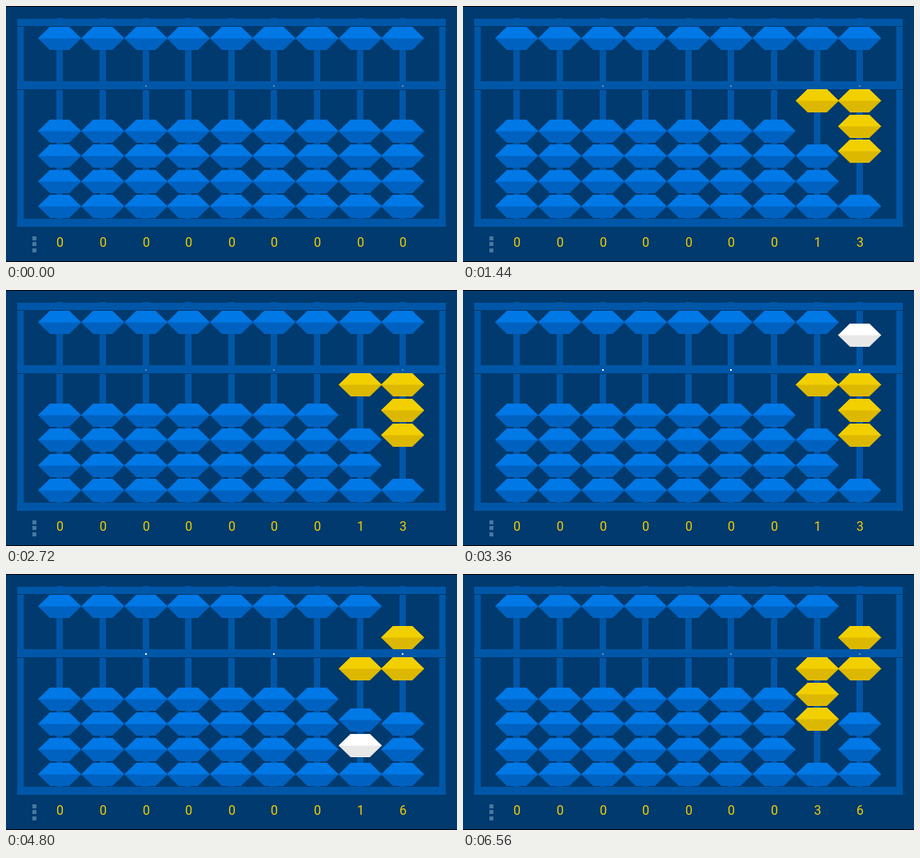
Recreate the animation shown at these times as an HTML page with a canvas. Size 564x320 px, loop 6.72 s.

```html
<!DOCTYPE html>
<html lang="en">
<head>
<meta charset="utf-8">
<title>Abacus</title>
<style>
html, body { margin: 0; width: 100%; height: 100%; overflow: hidden; background: #003a6e; }
canvas { display: block; }
</style>
</head>
<body>
<canvas id="stage" width="564" height="320"></canvas>
<script>
const ctx = document.getElementById('stage').getContext('2d');
const LOOP = 6720, STEP = 160, COLUMNS = 9;
const BACK = '#003a6e', WOOD = '#0057a8';
const BLUE = ['#0078e6', '#0062c0'];
const YELLOW = ['#f2d000', '#dcb900'];
const WHITE = ['#ffffff', '#e8e8e8'];

// Bead 0 is worth five; beads 1 to 4 are worth one each.
const moves = [
  { start: 150, end: 560, column: 8, beads: [1, 2, 3], held: 3, to: 1 },
  { start: 930, end: 1330, column: 7, beads: [1], held: 1, to: 1 },
  { start: 3180, end: 3580, column: 8, beads: [0], held: 0, to: 1 },
  { start: 3938, end: 4338, column: 8, beads: [2, 3], held: 2, to: 0 },
  { start: 4700, end: 5120, column: 7, beads: [2, 3], held: 3, to: 1 },
];

const columnX = i => Math.round(67.4 + i * 53.6);
const ease = u => (1 - Math.cos(Math.PI * u)) / 2;

function rect(color, x, y, w, h) {
  ctx.fillStyle = color;
  ctx.fillRect(x, y, w, h);
}

function polygon(color, points) {
  ctx.fillStyle = color;
  ctx.beginPath();
  points.forEach(([x, y]) => ctx.lineTo(x, y));
  ctx.fill();
}

function drawBead(x, y, [light, dark]) {
  const mid = y + 14.5, bottom = y + 29;
  const upper = [[x - 27, mid], [x - 12, y], [x + 12, y], [x + 27, mid]];
  polygon(dark, [...upper, [x + 12, bottom], [x - 12, bottom]]);
  polygon(light, upper);
}

function stateAt(t) {
  const columns = Array.from({ length: COLUMNS }, () => [0, 0, 0, 0, 0]);
  let held = null;
  for (const m of moves) {
    if (t < m.start) continue;
    const k = ease(Math.min(1, (t - m.start) / (m.end - m.start)));
    for (const b of m.beads) columns[m.column][b] = m.to ? k : 1 - k;
    if (t < m.end) held = m;
  }
  return { columns, held };
}

function drawFrame(held) {
  rect(BACK, 0, 0, 564, 320);
  rect('#000', 0, 0, 564, 1);
  rect('#000', 0, 319, 564, 1);

  for (let i = 0; i < COLUMNS; i++) rect(WOOD, columnX(i) - 4, 15, 8, 255);
  rect(WOOD, 14.3, 16, 8, 260);
  rect(WOOD, 541.7, 16, 8, 260);
  rect(WOOD, 14, 16, 536, 9);
  rect(WOOD, 14, 94, 536, 10);
  rect(WOOD, 14, 266, 536, 10);
  rect(BACK, 14, 25, 536, 1);
  rect(BACK, 14, 104, 536, 1);

  for (const i of [2, 5, 8]) rect(held ? '#fff' : '#5a8fb4', columnX(i) - 1, 99, 2, 2);
  for (let i = 0; i < 3; i++) rect('#4679a0', 33, Math.round(288 + i * 7.4), 5, 5);
}

function draw(t) {
  const { columns, held } = stateAt(t);
  drawFrame(held);

  ctx.font = '16px Roboto, sans-serif';
  ctx.textAlign = 'center';
  columns.forEach((beads, i) => {
    const x = columnX(i);
    let digit = 0;
    beads.forEach((k, b) => {
      const y = b ? 142 + (b - 1) * 31.4 - k * 37.6 : 26 + k * 39;
      const isHeld = held && held.column === i && held.held === b;
      if (k > 0.5) digit += b ? 1 : 5;
      drawBead(x, Math.round(y), isHeld ? WHITE : k > 0.5 ? YELLOW : BLUE);
    });
    ctx.fillStyle = '#f2d000';
    ctx.fillText(digit, x + 0.5, 300.5);
  });
}

function tick(now) {
  draw(Math.floor(now % LOOP / STEP) * STEP);
  requestAnimationFrame(tick);
}
requestAnimationFrame(tick);
</script>
</body>
</html>
```
